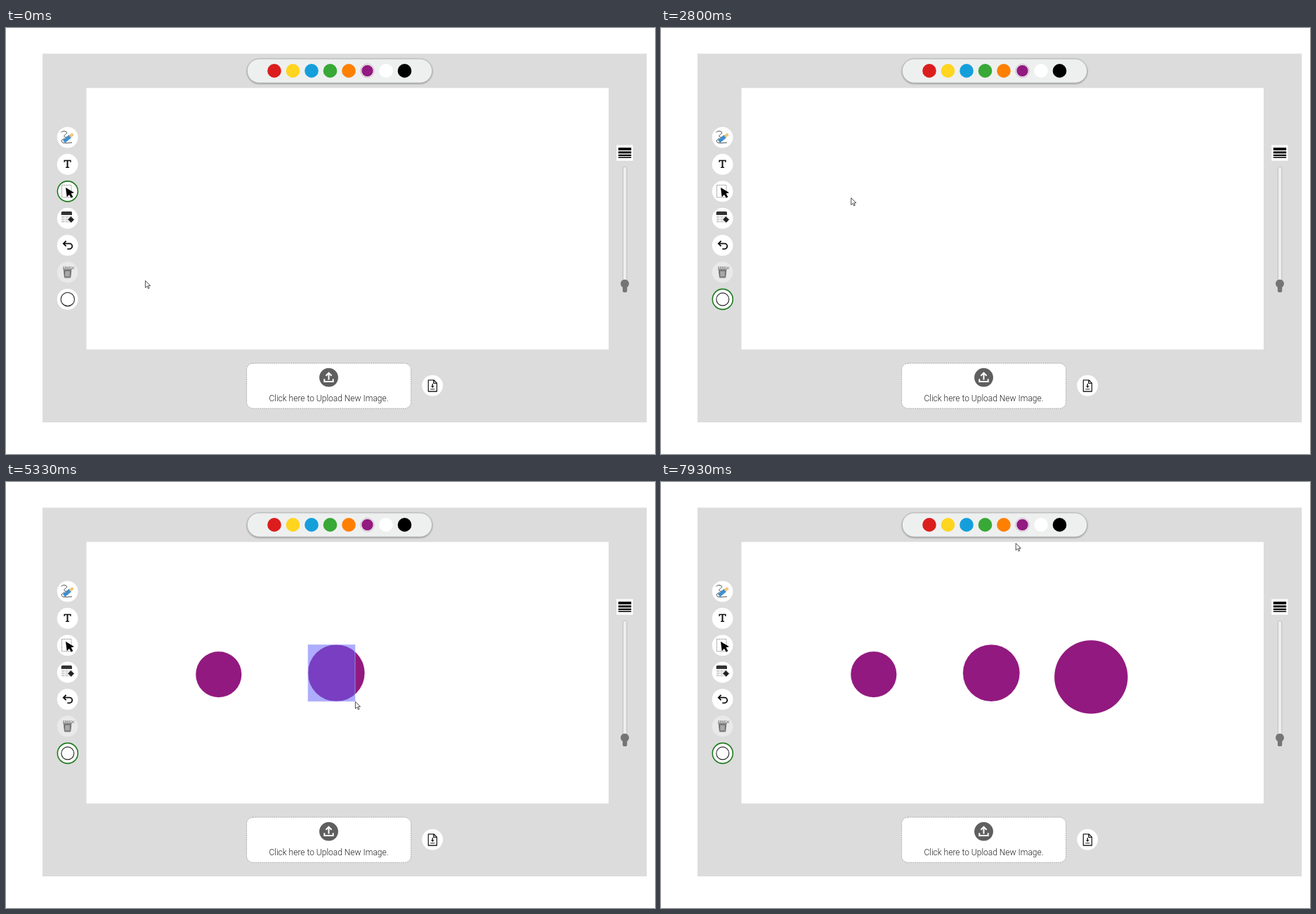
Recreate the animation shown at these times as an HTML page. Size 924 by 606 pixels, loop 8 s.

```html
<!DOCTYPE html>
<html lang="en">
<head>
<meta charset="utf-8">
<title>Drawing board</title>
<style>
html, body { margin: 0; width: 100%; height: 100%; overflow: hidden; background: #fff; }
svg { display: block; width: 924px; height: 606px; }
text { font-family: Roboto, Arial, sans-serif; text-anchor: middle; }
</style>
</head>
<body>
<svg viewBox="0 0 924 606">
  <defs>
    <filter id="soft" x="-10%" y="-20%" width="120%" height="150%">
      <feDropShadow dx="0" dy=".8" stdDeviation=".9" flood-opacity=".45"/>
    </filter>
  </defs>
  <rect x="52" y="36.5" width="860.3" height="524.5" fill="#dcdcdc"/>
  <rect x="114.5" y="85.3" width="743.5" height="372" fill="#fff"/>

  <rect x="343.4" y="44" width="263.2" height="34" rx="17" fill="#eef0f0" stroke="#aaa" stroke-width=".7" filter="url(#soft)"/>
  <g id="palette"></g>

  <g id="buttons"></g>
  <circle id="ring" cx="87.8" r="14.5" fill="none" stroke="#1f7a1f" stroke-width="1.6"/>

  <!-- marker -->
  <g fill="none">
    <path d="M78.5 148.5c2-2.500 7-2 8 0s-5 4-3.500 6 5 .5 7-2M84 157.500c-4 0-6 3-4 5s8 1 14 .5" stroke="#333" stroke-width=".9"/>
    <path d="M82.500 161.500l9-7.500" stroke="#3f8fd0" stroke-width="5"/>
    <path d="M91 154.500l4.500-3.700" stroke="#f0c47a" stroke-width="4"/>
  </g>
  <!-- text -->
  <path d="M82.4 187.8h10.2v3.100h-1.200l-.4-1.700h-2.500v8.400l1.600.3v1.100h-5.200v-1.100l1.600-.3v-8.400h-2.500l-.4 1.700h-1.200z" fill="#111"/>
  <!-- select -->
  <rect x="79.5" y="223.500" width="13.500" height="17.500" fill="none" stroke="#888" stroke-width=".8" stroke-dasharray="2 .6"/>
  <path d="M85 227l12 7.300-4.600 1.200 3 4.800-2.500 1.500-3-4.800-3.200 3.500z"/>
  <!-- table -->
  <path d="M79 276.500v-9h15v9z" fill="#d2d2d2"/>
  <path d="M79 270.500h15M79 273.500h15M84 267v10M89 267v10" stroke="#fff" stroke-width=".9"/>
  <path d="M78.700 266v-3.400q0-1.600 1.600-1.600h12.100q1.600 0 1.600 1.600v3.400z" fill="#333"/>
  <path d="M92.300 267.800l5 4.800-4.500 4.600-5-4.700z" fill="#222" stroke="#fff" stroke-width=".6"/>
  <!-- undo -->
  <path d="M85.600 303l-3.800 3.700 3.800 3.700M82.300 306.700h8.200a3.800 3.800 0 0 1 0 7.600h-3.200" fill="none" stroke="#111" stroke-width="1.800"/>
  <!-- bin -->
  <g fill="none" stroke="#777">
    <path d="M81 343h13.200" stroke-width="1.400"/>
    <path d="M82.300 344.500l1.200 10.500h8.200l1.200-10.500z" fill="#777"/>
    <path d="M85.500 346v7.500M87.600 346v7.500M89.700 346v7.500" stroke="#e9e9e9" stroke-width=".9"/>
    <path d="M81.500 340.500h11" stroke-width="2" stroke-dasharray="1.500 1"/>
    <path d="M93.500 339.500l3.500 3.500M97 339.500l-3.500 3.500" stroke-width=".9"/>
  </g>
  <!-- circle -->
  <circle id="round" cx="87.8" cy="385.9" fill="none" stroke="#222" stroke-width="1.1"/>

  <rect x="869.3" y="166.500" width="23.200" height="22.300" fill="#fff"/>
  <path d="M871.800 170.200h18.400v3.800h-18.400zM871.800 175.500h18.400v3h-18.400zM871.800 180h18.400v2.200h-18.400zM871.800 183.600h18.400v1.400h-18.400z"/>
  <rect x="878.4" y="197.500" width="5.400" height="178" rx="2" fill="#eee" stroke="#b5b5b5" stroke-width=".8"/>
  <path d="M878 364h6.200v10q0 2-2 2h-2.200q-2 0-2-2z" fill="#757575"/>
  <circle cx="881" cy="363.800" r="6" fill="#757575"/>

  <rect x="342.6" y="477" width="234" height="64.200" rx="9" fill="#fff" stroke="#999" stroke-width=".9" stroke-dasharray="1.600 1.400"/>
  <circle cx="459.5" cy="497.200" r="13.400" fill="#5f5f5f"/>
  <path d="M459.500 500.500v-9.500M455.400 494.800l4.100-4.200 4.100 4.200M453.300 499.200v3.800h12.400v-3.800" fill="none" stroke="#fff" stroke-width="2"/>
  <text x="459.5" y="531" font-size="12" font-weight="300" fill="#222">Click here to Upload New Image.</text>

  <circle cx="607.2" cy="508.600" r="14.900" fill="#fff"/>
  <path d="M601.300 500.800h7.800l4.300 4.300v11.900h-12.100zM608.800 501v4.400h4.400" fill="none" stroke="#222" stroke-width="1.300" stroke-linejoin="round"/>
  <path d="M606.600 506h1.400v3.200h1.800l-2.500 2.700-2.500-2.700h1.800zM604.300 513.200h6v1.100h-6z" fill="#222"/>

  <g id="discs" fill="#92197f" stroke="#92197f" stroke-opacity=".35" stroke-width=".6"></g>
  <rect id="marquee" fill="rgba(99,96,253,.52)" stroke="#b9b8f4" stroke-width=".6"/>

  <g id="tip">
    <rect x="4.8" y="378.400" width="57.400" height="16" rx="2.500" fill="#696969"/>
    <text x="33.5" y="389.300" font-size="8.25" font-weight="700" fill="#fff">Insert Circle</text>
  </g>
  <g id="cursor" fill="#fff" stroke="#222" stroke-width=".8" stroke-linejoin="round">
    <path id="arrow" d="M.4.5v9.900l2.400-2.200 1.600 3.500 1.600-.7-1.600-3.400h3.100z"/>
    <path id="hand" d="M-1 7.700V1a1 1 0 0 1 2 0v4.200q1-.9 1.900.2 1-.7 1.800.3 1.500-.4 1.600 1v3.500q0 1.400-.9 2.300v1.200H-.6v-1.200L-4 8.800q-.5-1.400.8-1.500z"/>
  </g>
</svg>
<script>
const LOOP = 8000, STEP = 200 / 3, LAG = 35, HOLD = 80, PICK = 1860;
const el = id => document.getElementById(id);

function set(node, attrs) {
  for (const k in attrs) node.setAttribute(k, attrs[k]);
  return node;
}
function circle(parent, attrs) {
  const c = document.createElementNS("http://www.w3.org/2000/svg", "circle");
  return el(parent).appendChild(set(c, attrs));
}
const show = (node, on) => set(node, { visibility: on ? "visible" : "hidden" });

["#db1e1d", "#ffd520", "#149fdb", "#38a836", "#ff8000", "#921a80", "#fff", "#000"].forEach((fill, i) => {
  const cx = 382 + i * 26.5, cy = 60.9, picked = i == 5;
  if (picked) circle("palette", { cx, cy, r: 9.6, fill: "#fff", stroke: "#b7a0b4", "stroke-width": .8 });
  circle("palette", { cx, cy, r: picked ? 8.2 : 9.8, fill });
});
const buttonY = i => 155.6 + i * 38.38;
for (let i = 0; i < 7; i++)
  circle("buttons", { cx: 87.6, cy: buttonY(i), r: 14.9, fill: i == 5 ? "#e9e9e9" : "#fff" });

// Cursor moves in order; a drag also draws a disc from its starting corner
const home = { x: 198, y: 359 };
const moves = [
  { from: 730, to: 1530, x: 87.5, y: 382.3 },
  { from: 1930, to: 2530, x: 270.3, y: 241.2 },
  { from: 2800, to: 3600, x: 335.3, y: 306.2, drag: true },
  { from: 3670, to: 4130, x: 430, y: 231.5 },
  { from: 4760, to: 5290, x: 497, y: 312, drag: true },
  { from: 5400, to: 5700, x: 560.2, y: 225.3 },
  { from: 5840, to: 6380, x: 650, y: 329.5, drag: true },
  { from: 6470, to: 6730, x: 659, y: 329.5 },
  { from: 6930, to: 7530, x: 644, y: 338 },
  { from: 7670, to: 7930, x: 504.8, y: 86.7 }
];
moves.forEach((m, i) => {
  m.start = i ? moves[i - 1] : home;
  if (m.drag) m.disc = circle("discs", {});
});

// Drags run at an even pace, other moves ease in and out
function along(m, t) {
  const u = Math.min(1, Math.max(0, (t - m.from) / (m.to - m.from)));
  const k = m.drag ? u : u * u * (3 - 2 * u);
  return { dx: (m.x - m.start.x) * k, dy: (m.y - m.start.y) * k };
}

function drawDisc(m, t) {
  const { x, y } = m.start;
  const { dx: width, dy: height } = along(m, t - LAG);
  const r = Math.max(width, height) / 2;
  show(set(m.disc, { cx: x + r, cy: y + r, r }), r > 0);
  if (r > 0 && t < m.to + HOLD) show(set(el("marquee"), { x, y, width, height }), true);
}

function draw(t) {
  let { x, y } = home;
  show(el("marquee"), false);
  for (const m of moves) {
    const { dx, dy } = along(m, t);
    x += dx;
    y += dy;
    if (m.drag) drawDisc(m, t);
  }
  const hover = Math.hypot(x - 87.6, y - buttonY(6)) < 15;
  set(el("cursor"), { transform: `translate(${x} ${y})` });
  show(el("hand"), hover);
  show(el("arrow"), !hover);
  show(el("tip"), hover);

  const picked = t > PICK;
  set(el("ring"), { cy: buttonY(picked ? 6 : 2) });
  set(el("round"), { r: picked ? 9 : 9.7 });
}

const start = performance.now();
function tick() {
  const t = (performance.now() - start) % LOOP;
  draw(Math.floor((t + 4) / STEP) * STEP % LOOP);
  requestAnimationFrame(tick);
}
tick();
</script>
</body>
</html>
```
